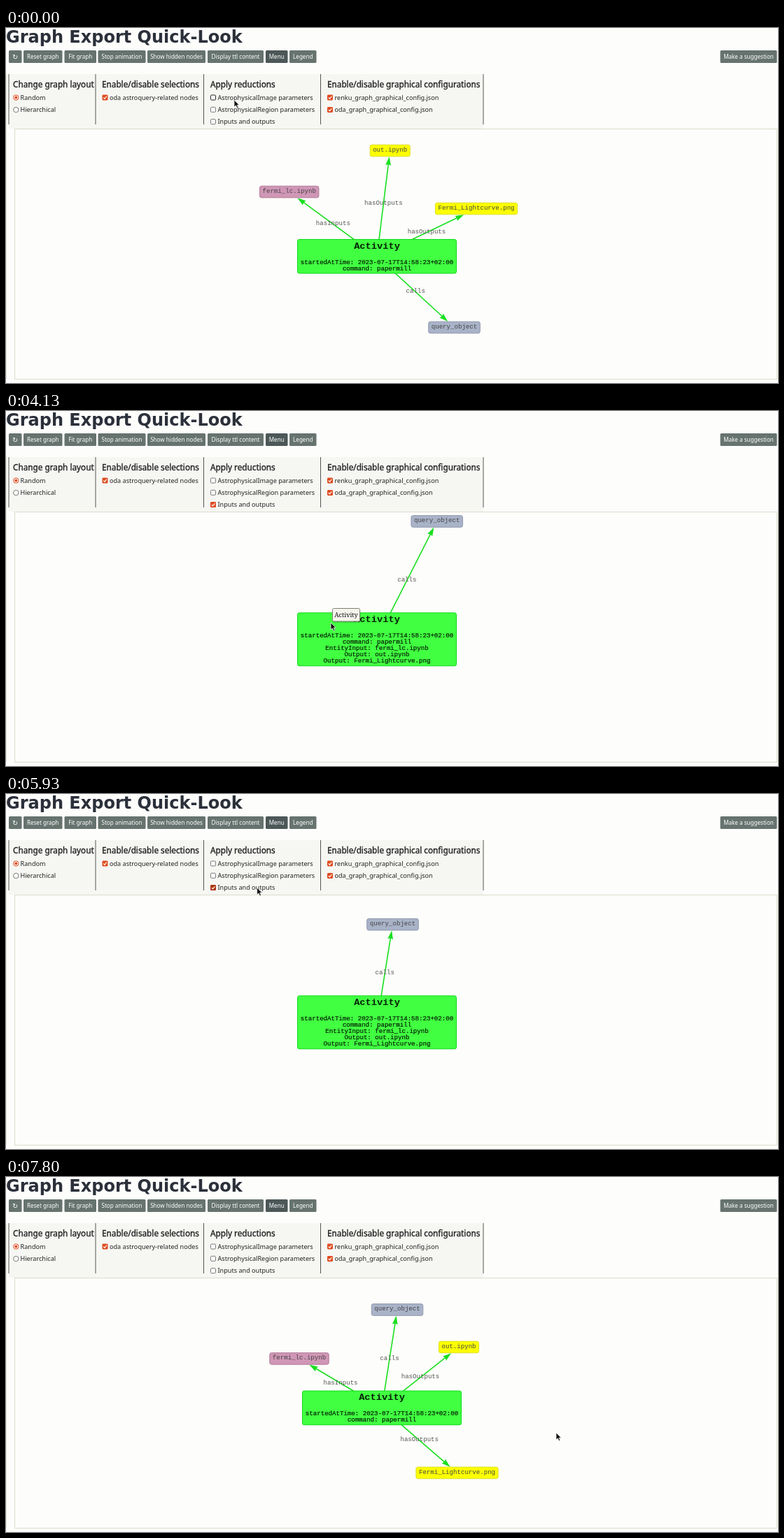
An HTML page that plays this animation: 1103 px wide and 508 px high, repeating every 8000 ms.

```html
<!DOCTYPE html>
<html lang="en">
<head>
<meta charset="utf-8">
<title>Graph Export Quick-Look</title>
<style>
  html, body { margin: 0; width: 100%; height: 100%; overflow: hidden; background: #fdfdfb; }
  svg { display: block; width: 1103px; height: 508px; }
  text { white-space: pre; }
  .title { font: bold 24px "DejaVu Sans", sans-serif; fill: #2b303a; }
  .button { font: 8.1px "Noto Sans", sans-serif; fill: #fff; text-anchor: middle; }
  .icon { font: 10px "DejaVu Sans", sans-serif; }
  .heading { font: 11.75px "Noto Sans", sans-serif; fill: #222; stroke: #222; stroke-width: .35; }
  .option { font: 9.1px "Noto Sans", sans-serif; fill: #222; }
  .mono { font: 9.1px "Liberation Mono", monospace; fill: #444; text-anchor: middle; }
  .edgeLabel { fill: #555; }
  .detail { fill: #062006; stroke: #062006; stroke-width: .22; }
  .name { font-size: 13.7px; font-weight: bold; fill: #062006; }
  .tip { font: 9.1px "Noto Serif", serif; fill: #111; text-anchor: middle; }
</style>
</head>
<body>
<svg viewBox="0 0 1103 508">
  <defs><clipPath id="view"><rect x="13" y="144.5" width="1088" height="358"/></clipPath></defs>
  <g id="page"></g>
  <g id="panel"></g>
  <g id="graph" clip-path="url(#view)"></g>
  <g id="tooltip">
    <rect x="467" y="283.5" width="39.5" height="19.5" rx="2" fill="#000" opacity=".15"/>
    <rect x="466.5" y="282.5" width="39" height="18.5" rx="2" fill="#f5f4ed" stroke="#808074"/>
    <text class="tip" x="486" y="295">Activity</text>
  </g>
  <path id="cursor" d="M0 0V10L2.4 7.9L4 11.6L5.8 10.8L4.2 7.2H7.3Z" fill="#111" stroke="#fff" stroke-width=".7"/>
</svg>
<script>
const LOOP = 8000;
const CHECK = 400, COLLAPSE = 3200, TIP_ON = 3230, EXPAND = 3960, TIP_OFF = 4500, UNCHECK = 6230;
const CHAR = 5.46;
const EDGE = '#1adf20';
const $ = id => document.getElementById(id);

const text = (cls, x, y, s) => `<text class="${cls}" x="${x}" y="${y}">${s}</text>`;
const box = (x, y, w, h, rx, fill, stroke = 'none') =>
  `<rect x="${x}" y="${y}" width="${w}" height="${h}" rx="${rx}" fill="${fill}" stroke="${stroke}"/>`;
const line = (x1, y1, x2, y2, color, width = 1) =>
  `<path d="M${x1} ${y1}L${x2} ${y2}" stroke="${color}" stroke-width="${width}"/>`;

// Static page
const button = ([x, w, label, fill = '#66736f', cls = '']) =>
  box(x, 32, w, 18, 1.5, fill) + text('button ' + cls, x + w / 2, cls ? 44.7 : 44, label);

const radio = (y, on) => `<circle cx="14.3" cy="${y}" r="3.7" fill="#fff" stroke="${on ? '#dc4a20' : '#777'}"/>` +
  (on ? `<circle cx="14.3" cy="${y}" r="2" fill="#dc4a20"/>` : '');

function checkbox(x, y, on, hover) {
  if (!on) return box(x + .5, y - 3.5, 7, 7, 1.2, '#fff', hover ? '#222' : '#777');
  return box(x, y - 4, 8, 8, 1.4, hover ? '#ac3512' : '#df4b1f') +
    `<path d="M${x + 1.8} ${y}l1.7 1.8l2.9-3.6" fill="none" stroke="#fff" stroke-width="1.2"/>`;
}

const buttons = [
  [4, 18.5, '↻', undefined, 'icon'], [25, 55.5, 'Reset graph'], [83.5, 45.5, 'Fit graph'],
  [131.5, 68, 'Stop animation'], [202, 83, 'Show hidden nodes'], [288, 80, 'Display ttl content'],
  [371, 31.5, 'Menu', '#4c5757'], [405, 38.5, 'Legend'], [1020.5, 81, 'Make a suggestion']
];
const headings = [
  [10, 'Change graph layout'], [137, 'Enable/disable selections'],
  [292, 'Apply reductions'], [459, 'Enable/disable graphical configurations']
];

$('page').innerHTML =
  text('title', 0, 21, 'Graph Export Quick-Look') +
  buttons.map(button).join('') +
  box(4, 66, 678, 78, 0, '#f6f6f3') +
  [4, 128, 282.5, 449.5, 682].map(x => line(x, 66, x, 138, '#555')).join('') +
  headings.map(([x, s]) => text('heading', x, 84.5, s)).join('') +
  radio(99.5, true) + text('option', 20.5, 102.8, 'Random') +
  radio(117, false) + text('option', 20.5, 120.3, 'Hierarchical') +
  checkbox(137.5, 99.5, true) + text('option', 148, 102.8, 'oda astroquery-related nodes') +
  checkbox(459, 99.5, true) + text('option', 469.5, 102.8, 'renku_graph_graphical_config.json') +
  checkbox(459, 117, true) + text('option', 469.5, 120.3, 'oda_graph_graphical_config.json') +
  line(.5, 66, .5, 502, '#e8e8df') +
  box(12.5, 144.5, 1089, 358, 0, '#fdfdfb', '#dcdccb');

// Motion: node keys are [time, dx, dy] from the hub, turned and stretched around it
const lerp = (a, b, u) => a + (b - a) * u;
const smooth = u => u * u * (3 - 2 * u);
const slowing = u => u * (1.6 - .6 * u);

function segment(keys, t) {
  const i = keys.findIndex(k => k[0] > t);
  if (i < 0) return [keys.at(-1), keys.at(-1), 0];
  const a = keys[Math.max(i - 1, 0)], b = keys[i];
  return [a, b, Math.max(0, (t - a[0]) / (b[0] - a[0]))];
}

function move(keys, t, ease) {
  const [a, b, u] = segment(keys, t);
  return [lerp(a[1], b[1], ease(u)), lerp(a[2], b[2], ease(u))];
}

function orbit(keys, t) {
  const [a, b, u] = segment(keys, t), e = slowing(u);
  const from = Math.atan2(a[2], a[1]);
  const turn = Math.atan2(a[1] * b[2] - a[2] * b[1], a[1] * b[1] + a[2] * b[2]);
  const angle = from + turn * e;
  const radius = lerp(Math.hypot(a[1], a[2]), Math.hypot(b[1], b[2]), e);
  return [radius * Math.cos(angle), radius * Math.sin(angle)];
}

const hubKeys = [[0, 530, 326.8], [7230, 530, 326.8], [7800, 537, 330.4]];
const cursorKeys = [
  [0, 326, 103], [330, 326, 134], [430, 326, 134], [670, 325, 143], [2330, 325, 143],
  [2730, 460, 300], [2930, 464, 303], [4450, 464, 303], [5250, 366, 170], [5600, 366, 170],
  [6000, 358, 131], [6360, 358, 131], [7180, 767, 360], [7300, 767, 360], [7800, 786, 366]
];

const reduced = t => t >= CHECK && t < UNCHECK;
const collapsed = t => t >= COLLAPSE && t < EXPAND;
const yellow = ['#fbff00', '#dede28'];
const nodes = [
  { label: 'fermi_lc.ipynb', edge: 'hasInputs', colors: ['#d096b6', '#b07c99'], hidden: reduced,
    keys: [[0, -125.3, -92.3], [CHECK, -125.3, -92.3], [UNCHECK, 37, -225], [6330, 36, -222],
      [7200, -131.5, -93.8], [7800, -118, -70.5]] },
  { label: 'out.ipynb', edge: 'hasOutputs', colors: yellow, hidden: reduced,
    keys: [[0, 18.7, -151.3], [CHECK, 18.7, -151.3], [UNCHECK, 114, -198], [6330, 112, -194],
      [7200, 119.7, -111.3], [7800, 110, -87]] },
  { label: 'Fermi_Lightcurve.png', edge: 'hasOutputs', colors: yellow, hidden: reduced,
    keys: [[0, 142, -68.3], [CHECK, 142, -68.3], [UNCHECK, 174, -152], [6330, 172.5, -148.3],
      [7200, 137.5, 74.2], [7800, 107.5, 93]] },
  { label: 'query_object', edge: 'calls', colors: ['#a9b3c8', '#8d97ab'], hidden: collapsed,
    keys: [[0, 110.5, 101.7], [COLLAPSE, 110.5, 101.7], [EXPAND, 98, -196], [4130, 85.8, -169],
      [4450, 66, -143], [4800, 47, -134], [5300, 32.3, -132], [6000, 22, -140.5], [7800, 22, -140.5]] }
];

const widthOf = node => node.label.length * CHAR + 8;

function drawEdge(node, [hx, hy], [dx, dy]) {
  const x = hx + dx, y = hy + dy, len = Math.hypot(dx, dy);
  const inset = Math.min(widthOf(node) / 2 / Math.abs(dx), 8.5 / Math.abs(dy));
  const tx = x - dx * inset, ty = y - dy * inset;
  const angle = Math.atan2(dy, dx) * 180 / Math.PI;
  return line(hx, hy, tx - dx / len * 7, ty - dy / len * 7, EDGE, 1.6) +
    `<path d="M0 0L-12.5 3.9L-11.2 0L-12.5-3.9Z" fill="${EDGE}" transform="translate(${tx} ${ty}) rotate(${angle})"/>` +
    text('mono edgeLabel', hx + dx / 2, hy + dy / 2 + 1.5, node.edge);
}

function drawNode(node, [hx, hy], [dx, dy]) {
  const w = widthOf(node), x = hx + dx, y = hy + dy;
  return box(x - w / 2, y - 8.3, w, 16.6, 2.6, ...node.colors) + text('mono', x, y + 1.5, node.label);
}

function drawHub([x, y], t) {
  const rows = ['startedAtTime: 2023-07-17T14:58:23+02:00', 'command: papermill'];
  if (reduced(t)) rows.push('EntityInput: fermi_lc.ipynb', 'Output: out.ipynb', 'Output: Fermi_Lightcurve.png');
  const h = 30.4 + rows.length * 9.1, top = y - h / 2;
  return box(x - 113.5, top, 227, h, 2.6, '#41ff41', '#12d91c') +
    text('mono name', x, top + 13, 'Activity') +
    rows.map((s, i) => text('mono detail', x, top + 35 + i * 9.1, s)).join('');
}

function drawReductions(t, [cx, cy]) {
  const inside = cx >= 292 && cx <= 444 && cy < 144;
  const hovered = !inside ? -1 : cy < 108 ? 0 : cy < 126 ? 1 : 2;
  return ['AstrophysicalImage parameters', 'AstrophysicalRegion parameters', 'Inputs and outputs']
    .map((s, i) => {
      const y = 99.5 + i * 17.3;
      return checkbox(292, y, i === 2 && reduced(t), i === hovered) + text('option', 302.5, y + 3.3, s);
    }).join('');
}

function render(t) {
  const hub = move(hubKeys, t, slowing);
  const pointer = move(cursorKeys, t, smooth);
  const shown = nodes.filter(n => !n.hidden(t)).map(n => [n, hub, orbit(n.keys, t)]);
  $('panel').innerHTML = drawReductions(t, pointer);
  $('graph').innerHTML = shown.map(args => drawEdge(...args)).join('') +
    drawHub(hub, t) + shown.map(args => drawNode(...args)).join('');
  $('tooltip').setAttribute('visibility', t >= TIP_ON && t < TIP_OFF ? 'visible' : 'hidden');
  $('cursor').setAttribute('transform', `translate(${pointer})`);
}

const start = performance.now();
function tick() {
  render((performance.now() - start) % LOOP);
  requestAnimationFrame(tick);
}
tick();
</script>
</body>
</html>
```
